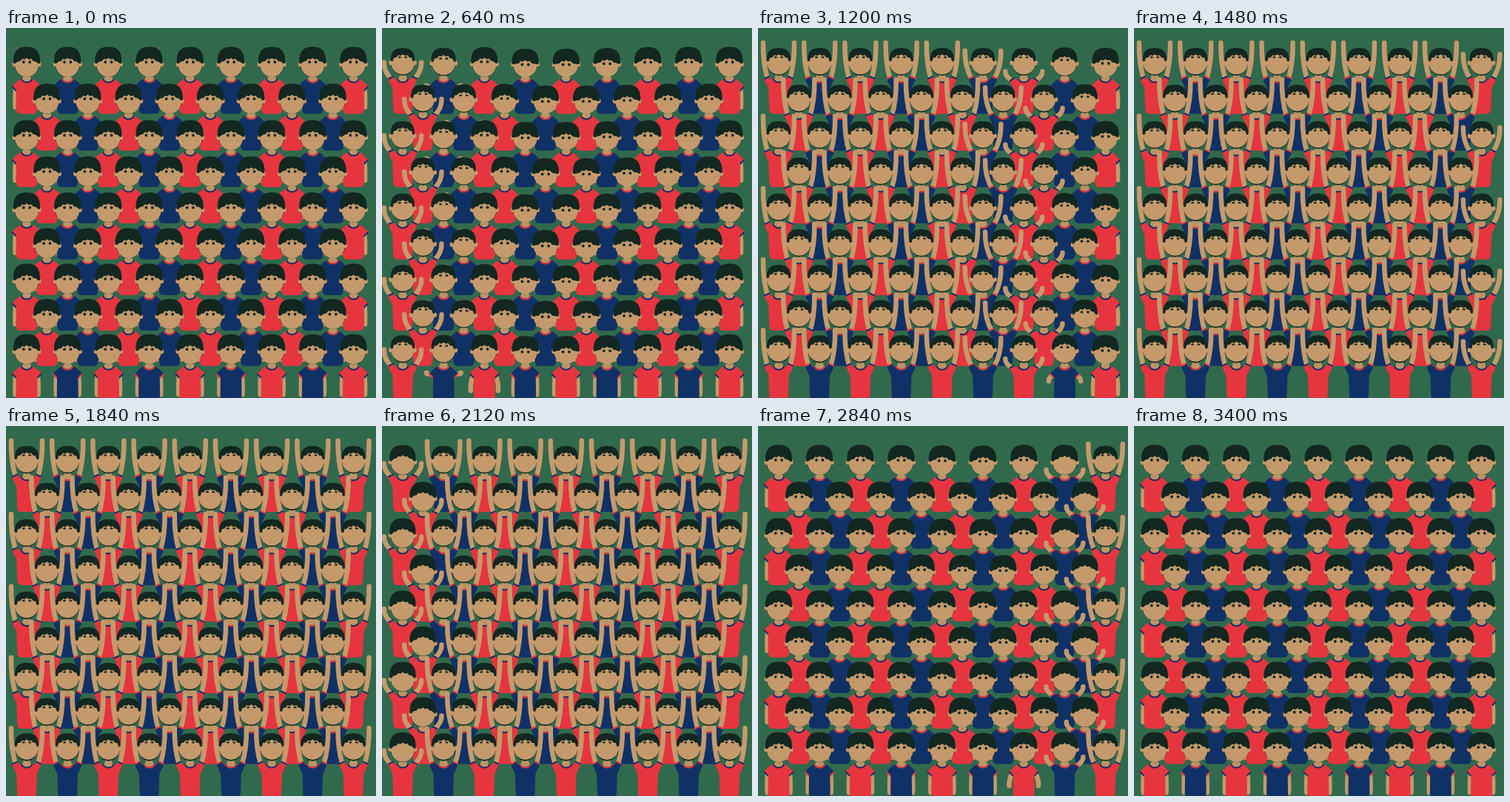
These frames come from a looping animation (500 px wide and 500 px high, 3440 ms). An HTML page with a canvas:

```html
<!DOCTYPE html>
<html>
<head>
<meta charset="utf-8">
<style>
html, body { margin: 0; width: 100%; height: 100%; overflow: hidden; background: #31694c; }
canvas { display: block; width: 100vmin; height: 100vmin; }
</style>
</head>
<body>
<canvas width="500" height="500"></canvas>
<script>
const g = document.querySelector('canvas').getContext('2d');
const LOOP = 3440, STEP = 40, DELAY = 100;
const GREEN = '#31694c', SKIN = '#c49a6c', NECK = '#bd9366';
const HAIR = '#12271f', RED = '#e6353f', BLUE = '#103166';

const mix = (a, b, u) => a + (b - a) * u;

function ease(t, from, to) {
  const u = Math.max(0, Math.min(1, (t - from) / (to - from)));
  return u * u * (3 - 2 * u);
}

// Rises during [a, b], holds, then falls during [c, d].
const pulse = (t, a, b, c, d) => ease(t, a, b) * (1 - ease(t, c, d));

function oval(x, y, rx, ry, color) {
  g.fillStyle = color;
  g.beginPath();
  g.ellipse(x, y, rx, ry, 0, 0, 7);
  g.fill();
}

function stroke(color, width, cap, path) {
  g.strokeStyle = color;
  g.lineWidth = width;
  g.lineCap = cap;
  g.beginPath();
  path();
  g.stroke();
}

function mirrored(draw) {
  for (const side of [1, -1]) {
    g.save();
    g.scale(side, 1);
    draw();
    g.restore();
  }
}

function drawArm(lift, raised, shirt, trim) {
  const swing = Math.sqrt(Math.max(0, Math.sin(Math.PI * lift)));
  const hx = mix(15.5, 21, lift) + 6.5 * swing, hy = mix(60, -27, lift);
  const sx = mix(17, 16, raised), sy = mix(35, 20, raised);
  const ax = 10, ay = mix(28, 33, raised);
  const len = Math.hypot(sx - ax, sy - ay), dx = (sx - ax) / len, dy = (sy - ay) / len;

  stroke(SKIN, 6.5, 'round', () => {
    g.moveTo(sx - dx * 3, sy - dy * 3);
    g.quadraticCurveTo(hx + .5, mix(hy, sy, .6), hx, hy);
  });
  stroke(shirt, 8.5, 'butt', () => { g.moveTo(ax, ay); g.lineTo(sx, sy); });
  stroke(trim, 2, 'butt', () => {
    g.moveTo(sx - dy * 4.2, sy + dx * 4.2);
    g.lineTo(sx + dy * 4.2, sy - dx * 4.2);
  });
}

function drawBody(t, shirt, trim) {
  const lift = pulse(t, 380, 790, 2000, 2300), raised = ease(lift, .3, .65);
  mirrored(() => drawArm(lift, raised, shirt, trim));

  const w = mix(14.5, 13, raised);
  g.fillStyle = shirt;
  g.beginPath();
  g.moveTo(-6, 22);
  g.quadraticCurveTo(-13, 22, -14, 29);
  g.lineTo(-w, 60);
  g.quadraticCurveTo(-w, 69, -w + 6, 69);
  g.lineTo(w - 6, 69);
  g.quadraticCurveTo(w, 69, w, 60);
  g.lineTo(14, 29);
  g.quadraticCurveTo(13, 22, 6, 22);
  g.fill();

  oval(0, 21.5, 6, 4, NECK);
  stroke(trim, 2, 'butt', () => g.ellipse(0, 21.5, 7, 5, 0, 0, Math.PI));
  g.fillStyle = NECK;
  g.fillRect(-4.5, 12, 9, 11);
}

function drawHead(t) {
  const up = pulse(t, 400, 600, 2010, 2160);
  const eyesUp = pulse(t, 400, 620, 2100, 2260);
  const dip = pulse(t, 0, 240, 340, 460) + .4 * pulse(t, 2220, 2340, 2340, 2600);
  const top = -21.5 + 1.5 * up + 2.5 * dip;
  const fringe = -6 - 5 * up + 3 * dip;
  const eye = -1 - 6.5 * eyesUp + 3.5 * dip;
  const w = mix(18, 16, up), side = mix(1, -2, up) + dip;
  const faceY = mix(2, 0, up), faceW = mix(16.2, 15.5, up);

  oval(0, -1, w - .5, -top - 1.5, HAIR);
  mirrored(() => oval(faceW + .5, faceY, 2.8, 3.2, SKIN));
  oval(0, faceY, faceW, mix(17, 15.8, up), SKIN);
  mirrored(() => {
    oval(9, eye + 8, 1.8, 1.3, `rgba(200,105,75,${.2 * (1 - eyesUp)})`);
    oval(4.2, eye, 1.9, mix(1.9, 1.2, eyesUp), HAIR);
  });

  // Hair cap with a ragged, arched fringe.
  g.fillStyle = HAIR;
  g.beginPath();
  g.moveTo(-w, side);
  g.bezierCurveTo(-w - 1, top * .8, -w * .6, top, 0, top);
  g.bezierCurveTo(w * .6, top, w + 1, top * .8, w, side);
  g.lineTo(w - 2.5, side);
  for (let x = 12; x >= -12; x -= 3) {
    const tuft = x % 2 ? 1.2 : -.6;
    g.lineTo(x, fringe + x * x / 30 + tuft);
  }
  g.lineTo(2.5 - w, side);
  g.fill();
}

function draw(now) {
  const t = Math.floor(now % LOOP / STEP) * STEP;
  g.fillStyle = GREEN;
  g.fillRect(0, 0, 500, 500);
  for (let row = 0; row < 9; row++) {
    const odd = row % 2, y = 47 + row * (49.8 - .16 * row);
    for (let i = 0; i < 9 - odd; i++) {
      const colors = i % 2 ? [BLUE, RED] : [RED, BLUE];
      g.save();
      g.translate((odd ? 55.3 : 28) + i * 55.2, y);
      drawBody(t - i * DELAY, ...colors);
      drawHead(t - i * DELAY);
      g.restore();
    }
  }
}

const start = performance.now();
function tick() {
  draw(performance.now() - start);
  requestAnimationFrame(tick);
}
tick();
</script>
</body>
</html>
```
